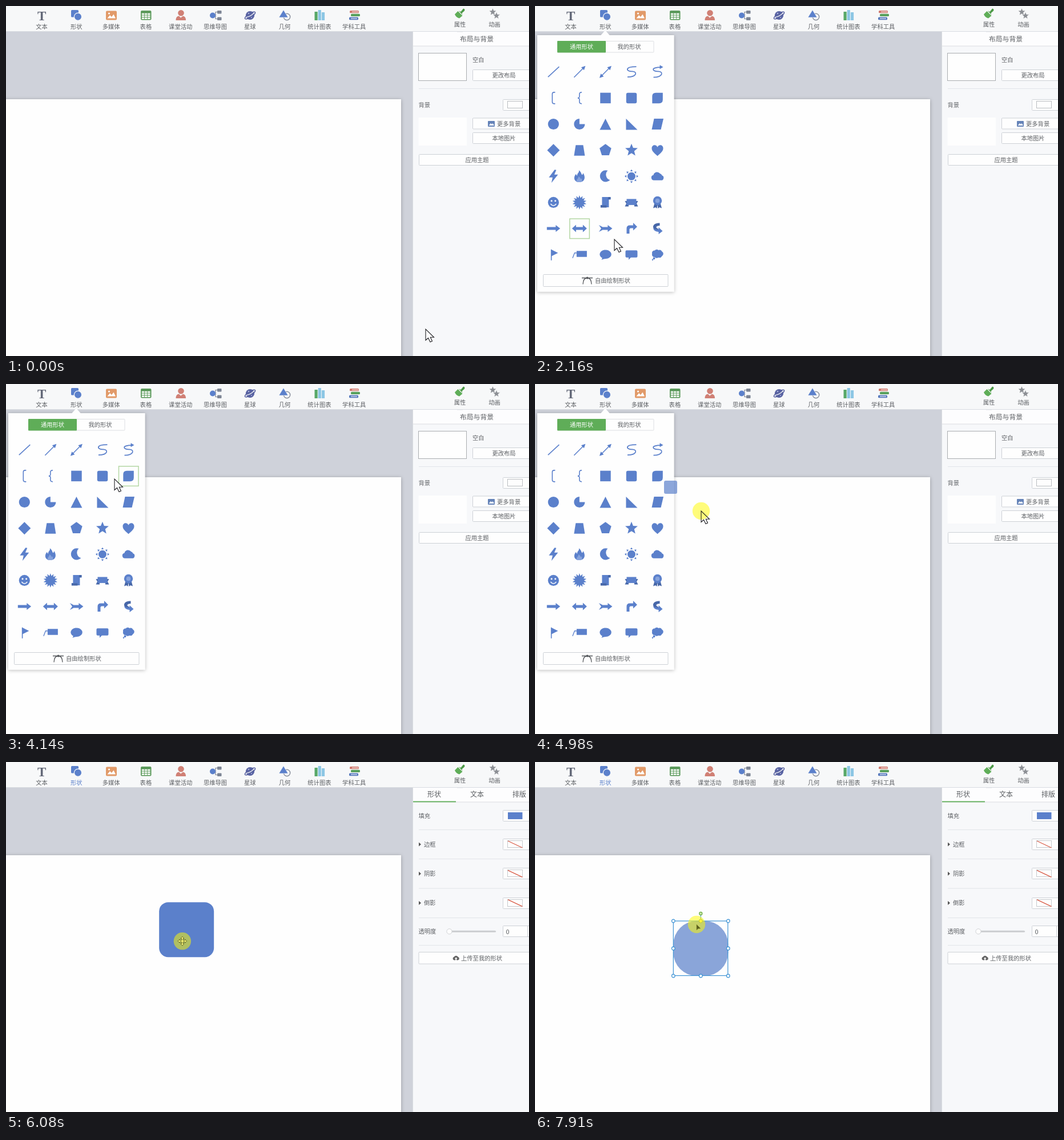
These frames come from a looping animation (916x612 px, 8 s). An HTML page:

```html
<!DOCTYPE html>
<html lang="zh-CN">
<head>
<meta charset="utf-8">
<style>
html, body { margin: 0; width: 100%; height: 100%; overflow: hidden; background: #cfd2da; }
svg { display: block; width: 916px; height: 612px; }
text { font-family: "Noto Sans CJK SC", "Noto Sans CJK", "Noto Sans", sans-serif; }
</style>
</head>
<body>
<svg id="stage" viewBox="0 0 916 612" xmlns="http://www.w3.org/2000/svg"></svg>
<script>
const BLUE = '#5b80cb', DARK = '#4767a8', GREEN = '#5fad58', INK = '#5c5f63', LINE = '#cdd1d6';
const LOOP = 8000;

// ---- markup helpers ----
const text = (x, y, s, o = {}) => {
  const size = o.size || 10.3;
  return `<text x="${x}" y="${y + size * 0.37}" font-size="${size}" fill="${o.fill || INK}"` +
    ` text-anchor="${o.anchor || 'middle'}"${o.id ? ` id="${o.id}"` : ''}>${s}</text>`;
};
const left = (x, y, s, o = {}) => text(x, y, s, { ...o, anchor: 'start' });
const rect = (x, y, w, h, fill, more = '') =>
  `<rect x="${x}" y="${y}" width="${w}" height="${h}" fill="${fill}" ${more}/>`;
const box = (x, y, w, h, stroke = LINE, r = 1) =>
  rect(x + 0.5, y + 0.5, w, h, '#fefefe', `stroke="${stroke}" rx="${r}"`);
const dot = (x, y, r, fill, more = '') => `<circle cx="${x}" cy="${y}" r="${r}" fill="${fill}" ${more}/>`;
const path = (d, fill, more = '') => `<path d="${d}" fill="${fill}" ${more}/>`;
const stroke = (d, color = BLUE, w = 1.6) => path(d, 'none', `stroke="${color}" stroke-width="${w}"`);
const group = (id, body, more = '') => `<g id="${id}" ${more}>${body}</g>`;
const rule = y => rect(723, y, 193, 1, '#e2e5e9');

// regular polygon (inner = outer) or star
function star(n, outer, inner = outer, cx = 0, cy = 0) {
  const m = inner === outer ? n : n * 2, pts = [];
  for (let i = 0; i < m; i++) {
    const a = i / m * 2 * Math.PI - Math.PI / 2, r = i % 2 && m > n ? inner : outer;
    pts.push((cx + r * Math.cos(a)).toFixed(2) + ' ' + (cy + r * Math.sin(a)).toFixed(2));
  }
  return 'M' + pts.join('L') + 'Z';
}

// ---- toolbar ----
function toolbar() {
  const names = ['文本', '形状', '多媒体', '表格', '课堂活动', '思维导图', '星球', '几何', '统计图表', '学科工具'];
  let s = rect(0, 0, 916, 44, '#f7f8f9') + rect(0, 44, 916, 1, '#d9dce1');
  names.forEach((n, i) => s += text(62.5 + i * 60.8, 36, n, { id: 'tool' + i }));
  s += '<text x="62.7" y="24.5" font-size="23" font-weight="700" text-anchor="middle" fill="#626777" style="font-family:\'Liberation Serif\',serif">T</text>';
  s += rect(114, 7, 13, 12.5, BLUE, 'rx="1.5"') + dot(126, 18.8, 6.6, BLUE, 'stroke="#f7f8f9" stroke-width="1.2"');
  s += rect(175, 8.5, 19, 16, '#e19a69', 'rx="2"') + path('M177.5 21.5L182 16l3 3 3.500-4.500 3.500 7Z', '#fff') + dot(180.500, 13, 1.6, '#fff');
  s += rect(236, 8, 18.5, 16.500, '#5c9a5c', 'rx="2"');
  for (let i = 0; i < 9; i++) s += rect(237.800 + i % 3 * 5.200, 12.800 + (i / 3 | 0) * 3.700, 4.300, 2.600, '#fff');
  s += dot(306.500, 12.200, 5.300, '#d08075') + path('M297.500 25Q297.500 17.500 303 17.500L306 20.500 310 17.500Q315 18 315 25Z', '#d08075');
  s += stroke('M362 16.500H367V10.500H371M367 16.500V22.500H371', '#7d8595', 1.2) + dot(362, 16.500, 5, BLUE) +
    rect(370, 8, 7.500, 5.500, '#7d8595', 'rx="1"') + rect(370, 19.500, 7.500, 5.500, '#7d8595', 'rx="1"');
  s += dot(427.500, 16.500, 7.600, '#5963a2') +
    '<ellipse cx="427.500" cy="16.500" rx="10.500" ry="3.400" fill="none" stroke="#5963a2" stroke-width="1.500" transform="rotate(-32 427.500 16.500)"/>' +
    stroke('M421 19.500Q428 18.500 434 12.500', '#f7f8f9', 1.1) + dot(425, 13, 1.3, '#aab2dc') + dot(430, 20, 1, '#aab2dc');
  s += dot(492, 19, 5.700, 'none', 'stroke="#8b919d" stroke-width="1.500"') + path('M486 7L494 20H478Z', BLUE, 'stroke="#f7f8f9" stroke-width=".6"');
  s += rect(540.500, 10, 5.200, 15, '#58a868') + rect(546.700, 7, 5.200, 18, '#8cc6e4') + rect(552.900, 11, 5.200, 14, '#8cc6e4');
  s += rect(602, 8, 16, 4.300, '#d0776c', 'rx="1.500"') + rect(604, 13.800, 16, 4.300, '#58a05c', 'rx="1.500"') +
    rect(601, 19.600, 16, 4.600, '#5578bc', 'rx="1.500"') + rect(606, 9.700, 11, 1, '#fff') + rect(604, 21.400, 11, 1, '#fff');
  s += path('M786 14.500L791.500 9 799.500 17 794 21.500Q788 20 786 14.500Z', GREEN) + path('M793 8.500L796.500 10 801 4.500Q804.500 5 803 8.500L798.500 12.500 799.500 15.500Z', '#4d9a48');
  s += path(star(5, 6.200, 2.700, 852.500, 10.500), '#8d9095') + path(star(5, 7, 3, 859, 17), '#8d9095', 'stroke="#f7f8f9" stroke-width=".8"');
  return s + text(795, 32, '属性') + text(855.500, 32, '动画');
}

// ---- right side ----
const sideBase = () => rect(713, 45, 203, 567, '#f7f8fa') + rect(712, 45, 1, 567, '#d9dce1') +
  rect(713, 45, 203, 25, '#fdfdfe') + rect(713, 69.500, 203, 1, '#dbdee2') +
  path('M790 45L795 41 800 45Z', '#fdfdfe', 'stroke="#d3d6db" stroke-width=".7"');

const pageProps = () => text(824.500, 57.500, '布局与背景', { size: 11.8 }) +
  box(722, 82, 84, 48, '#a9acb0', 0) + left(817, 94, '空白') +
  box(817, 111, 110, 19) + text(872, 121.500, '更改布局') + rule(144) +
  left(722.500, 173, '背景') + box(870, 163, 60, 19) + box(878, 166, 26, 12, '#b9bcc0', 0) +
  rect(722.500, 195, 84.500, 49, '#fefefe') + box(817, 195.500, 110, 19) +
  rect(844, 201, 12, 10, '#6583b8', 'rx="1"') + path('M845.500 209L849 205l2 2 1.500-2 2.500 4Z', '#fff') +
  left(860, 206, '更多背景') + box(817, 221, 110, 19) + text(872, 231, '本地图片') +
  box(723, 259, 204, 19) + text(825, 269.500, '应用主题');

function shapeProps() {
  let s = text(750, 57, '形状', { size: 12 }) + text(825, 57, '文本', { size: 12 }) + text(899, 57, '排版', { size: 12 }) +
    rect(713, 68.500, 75, 1.800, GREEN) + left(722.500, 94, '填充') + box(870, 84, 60, 19) + rect(879, 88, 25.500, 12, BLUE);
  [118, 169, 220.500, 272, 320].forEach(y => s += rule(y));
  ['边框', '阴影', '倒影'].forEach((n, i) => {
    const y = 144 + i * 51.300;
    s += path(`M723 ${y - 3.500}l4 3.500-4 3.500Z`, '#555') + left(732, y, n) + box(870, Math.round(y) - 10, 60, 19) +
      box(878, Math.round(y) - 7, 26, 12, '#c6c9cd', 0) + stroke(`M879 ${y - 6}L904.500 ${y + 6}`, '#d85a45', 1.3);
  });
  return s + left(722.500, 296.500, '透明度') + rect(777, 294.800, 81, 3, '#cbcdd0', 'rx="1.500"') +
    dot(776.500, 296.300, 4.600, '#fefefe', 'stroke="#cfd1d4"') + box(870, 286, 60, 19) + left(875.500, 296.500, '0', { size: 11 }) +
    rect(913, 286, 1, 20, LINE) + box(722.500, 332, 204, 20.500) +
    path('M785 346.500A2.900 2.900 0 0 1 784.800 340.800A3.800 3.800 0 0 1 791.600 340.800A2.900 2.900 0 0 1 791.400 346.500Z', '#666') +
    path('M788.200 341.500l2.400 2.600h-1.500v3.600h-1.800v-3.600h-1.500Z', '#fefefe') + left(797, 343, '上传至我的形状');
}

// ---- shape picker ----
const cellX = c => 32.300 + c * 45.550, cellY = r => 115.200 + r * 45.650;
const row = (r, items) => items.map((m, c) =>
  `<g transform="translate(${cellX(c)} ${cellY(r)})" fill="${BLUE}">${m[0] === '<' ? m : `<path d="${m}"/>`}</g>`).join('');

function picker() {
  const tip = 'M10.500-10.500L8-3 3-8Z', tail = 'M-10.500 10.500L-8 3-3 8Z';
  const cloud = 'M-6 7A4.700 4.700 0 0 1-7-2.300A6.500 6.500 0 0 1 4.500-4.800A5 5 0 0 1 8-1.500A4.400 4.400 0 0 1 6.500 7Z';
  let rays = '';
  for (let i = 0; i < 8; i++) rays += `<path d="M-2.200-8.800L0-12 2.200-8.800Z" transform="rotate(${i * 45})"/>`;
  let puffs = '';
  for (let i = 0; i < 7; i++) puffs += dot(6 * Math.cos(i * 0.9), -1.500 + 3.400 * Math.sin(i * 0.9), 4.200, BLUE);
  return rect(4, 51, 239.500, 448.500, '#fefefe', 'filter="url(#soft)"') + path('M115 51.500L123 42.500 131 51.500Z', '#fefefe') +
    rect(39.500, 61.500, 168.500, 19.500, '#fefefe', 'stroke="#dddfe2" rx="1"') + rect(39, 61, 85, 20.500, GREEN, 'rx="1"') +
    text(81.500, 71.500, '通用形状', { fill: '#fff' }) + text(165, 71.500, '我的形状') +
    row(0, [
      stroke('M-9.500 9L10-9'),
      stroke('M-9.500 9.500L7-7') + path(tip, BLUE),
      stroke('M-7 7L7-7') + path(tip + tail, BLUE),
      stroke('M8.500-9C-13-9-9-.500 1-.800C11-1 10 9-7 9', BLUE, 1.800),
      stroke('M6-8C-13-8-9-.500 1-.800C11-1 10 9-7 9.500', BLUE, 1.800) + path('M10-8.500L4-12V-5Z', BLUE)
    ]) +
    row(1, [
      stroke('M3-10H1Q-2-10-2-7V7Q-2 10 1 10H3'),
      stroke('M4-10Q0-10 0-7V-3Q0 0-3 0Q0 0 0 3V7Q0 10 4 10'),
      rect(-9.200, -9.200, 18.500, 18.500, BLUE),
      rect(-9.200, -9.200, 18.500, 18.500, BLUE, 'rx="3"'),
      'M-3-9.200H9.300V3Q9.300 9.300 3 9.300H-9.200V-3Q-9.200-9.200-3-9.200Z'
    ]) +
    row(2, [
      dot(0, 0, 9.600, BLUE), 'M0 0V-9.600A9.600 9.600 0 1 0 9.600 0Z', 'M0-9.500L10 10H-10Z',
      'M-9.500-9.500V10H10.500Z', 'M-6-9.500H10.500L6 9.500H-10Z'
    ]) +
    row(3, [
      star(4, 11), 'M-6.500-9H6.500L9.500 9.500H-9.500Z', star(5, 10.800), star(5, 11.500, 5),
      'M0 10C-7 4-10 1-10-3.500C-10-9.500-2.500-11 0-5.500C2.500-11 10-9.500 10-3.500C10 1 7 4 0 10Z'
    ]) +
    row(4, [
      'M2-11.500L-8 2H-1.500L-3.500 11.500 8-3H1.500L5-11Z',
      path('M-1-10.500C4-7 3-3 5-2.500Q6.500-4 6-6C11 0 10 9 2 10H-3C-11 8-10 0-6-4Q-5-1-4-1C-4-6 0-6-1-10.500Z', BLUE) +
        path('M-5 10C-6 5-2 5-1.500 0Q2 3 2 5 3 4 3.500 3.500Q6 8 3 10Z', '#86a3dd'),
      'M4-10A10.200 10.200 0 1 0 8 6.500A9.800 9.800 0 0 1 4-10Z',
      dot(0, 0, 7, BLUE) + rays, cloud
    ]) +
    row(5, [
      dot(0, 0, 9.600, BLUE) + dot(-3.300, -2.800, 1.500, '#fff') + dot(3.300, -2.800, 1.500, '#fff') + stroke('M-5 2.500Q0 8.500 5 2.500', '#fff', 1.4),
      star(14, 12.500, 8),
      path('M-6-9.500H9V-5H6V8.500H-8.500V4.500H-6Z', BLUE) + path('M5-9.500H9V-5.500H4ZM-8.500 5H2V9H-8.500Z', DARK),
      path('M-11.500-2.500H-5V7H-11.500L-9 2ZM11.500-2.500H5V7H11.500L9 2Z', DARK) + rect(-8.500, -6, 17, 10.500, BLUE),
      path('M-5 1L-7.500 10-3.500 8.500-1 10.500 0 4 1 10.500 3.500 8.500 7.500 10 5 1Z', DARK) + dot(0, -3, 7.700, BLUE) + dot(0, -3, 3.800, '#86a3dd')
    ]) +
    row(6, [
      'M-11.500-2.500H4V-6L11.800 0 4 6V2.500H-11.500Z',
      'M-13 0L-6-6.500V-2.500H6V-6.500L13 0 6 6.500V2.500H-6V6.500Z',
      'M-11.500-6L-5-2.500H4V-6L12 0 4 6V2.500H-5L-11.500 6-7.500 0Z',
      'M-8.500 9V0Q-8.500-5.500-3-5.500H3V-10L10-3 3 3.500V-.500H-1Q-3.500-.500-3.500 2V9Z',
      path('M4-9.500C-6-10-10-4-6 1Q-4 4 2 4.500V1Q-3-1-2-3 0-5 4-5Z', DARK) + path('M-7.500-1Q-5 2 2 2V-2L9 4.500 2 10V6Q-7 5-7.500-1Z', BLUE)
    ]) +
    row(7, [
      path('M-4-9L8-3-4 3Z', BLUE) + rect(-4.500, -9, 1.600, 19, BLUE),
      rect(-5, -6.500, 18, 10.500, BLUE) + stroke('M-5-3H-8.500L-12 6', BLUE, 1.300),
      'M-7 9L-5.500 6A10.200 7.800 0 1 1 0 7.300Q-3 7.300-7 9Z',
      'M-8.500-7.500H8.500Q10.500-7.500 10.500-5.500V3Q10.500 5 8.500 5H-1L-5 9V5H-8.500Q-10.500 5-10.500 3V-5.500Q-10.500-7.500-8.500-7.500Z',
      puffs + dot(0, -1.500, 5, BLUE) + dot(-6, 6.500, 1.900, BLUE) + dot(-8.500, 9, 1.200, BLUE)
    ]) +
    box(14, 469, 218.500, 21) + stroke('M82 475.500H101M84 486.500Q84.500 475.500 91.500 475.500T99 486.500', '#55585c', 1.3) +
    dot(91.500, 475.500, 1.900, '#55585c') + left(105, 480.500, '自由绘制形状');
}

// ---- selected shape ----
const SIZE = 96, ring = 'stroke="#3c92d4" stroke-width="1.200"';
function handles() {
  const h = SIZE / 2;
  let s = rect(0, 0, SIZE - 0.500, SIZE - 0.500, 'none', ring) + stroke(`M${h} -11V0`, '#3c92d4', 1.1) +
    dot(h, -13, 2.600, '#c9e8a5', 'stroke="#66a83f" stroke-width="1.100"');
  for (let i = 0; i < 9; i++) if (i !== 4) s += dot(i % 3 * h, (i / 3 | 0) * h, 2.800, '#fff', ring);
  return s + path('M0-3.500L3.500 0 0 3.500-3.500 0Z', '#fff27a', 'id="knob" stroke="#b9a92c" stroke-width=".8"');
}

const ARROW = 'M0 0V19.500L4.500 15.500 8 22.500 11.500 21 8.300 14.300H14.500Z';
const MOVE = 'M0-8L3-4.500H1.200V-1.200H4.500V-3L8 0 4.500 3V1.200H1.200V4.500H3L0 8-3 4.500H-1.200V1.200H-4.500V3L-8 0-4.500-3V-1.200H-1.200V-4.500H-3Z';
const SMALL = 'M0 0V10L2.600 7.600 7 7Z';

stage.innerHTML =
  '<defs><filter id="soft" x="-10%" y="-10%" width="120%" height="120%"><feDropShadow dx="0" dy="1" stdDeviation="3" flood-color="#000" flood-opacity=".28"/></filter></defs>' +
  rect(0, 0, 916, 612, '#cfd2da') + rect(-10, 163, 702, 470, '#fefefe', 'filter="url(#soft)"') +
  sideBase() + group('pageProps', pageProps()) + group('shapeProps', shapeProps()) + toolbar() +
  group('shape', rect(0, 0, SIZE, SIZE, BLUE, 'id="body"') + group('grips', handles())) +
  group('picker', picker()) + rect(0, 0, 34.500, 34.500, 'none', 'id="hover" stroke="#b4d7a4" stroke-width="1.500"') +
  rect(-11.500, -11.500, 23, 23, BLUE, 'id="ghost" rx="3" opacity=".7"') +
  group('tooltip', rect(133.500, 48.500, 244, 45, '#eeeeee', 'rx="2" filter="url(#soft)"') +
    left(143.500, 62, '形状', { fill: '#8a8a8a' }) + left(143.500, 80.500, '选取要绘制的形状，例如：线条、矩形、三角形等', { fill: '#a2a2a2', size: 10.15 })) +
  group('mouse', path('', '#fff', 'id="fill"') + dot(0, 0, 15.200, '#fffa00', 'id="halo" fill-opacity=".52"') +
    path('', 'none', 'id="edge" stroke="#1e1e22" stroke-width="1.100"'));

// ---- motion ----
const $ = id => document.getElementById(id);
const set = (id, k, v) => $(id).setAttribute(k, v);
const show = (id, on) => set(id, 'display', on ? 'inline' : 'none');
const place = (id, x, y) => set(id, 'transform', `translate(${x} ${y})`);
const within = (t, a, b) => t >= a && t < b;
const ramp = (t, a, b) => Math.max(0, Math.min(1, (t - a) / (b - a)));

// keys are [time, x, y, eased]
function along(keys, t) {
  const i = keys.findIndex(k => k[0] > t);
  if (i === 0) return keys[0].slice(1, 3);
  if (i < 0) return keys[keys.length - 1].slice(1, 3);
  const [t0, x0, y0] = keys[i - 1], [t1, x1, y1, eased] = keys[i];
  let u = (t - t0) / (t1 - t0);
  if (eased) u = u * u * (3 - 2 * u);
  return [x0 + (x1 - x0) * u, y0 + (y1 - y0) * u];
}

const approach = [[70, 735, 565], [790, 129, 23, 1], [960, 129, 23], [1270, 145, 62], [1720, 150, 132],
  [1770, 150, 132], [1850, 196, 165], [1930, 212, 235], [2010, 180, 330], [2080, 84, 385], [2160, 139, 408]];
const choose = [[3410, 139, 408], [3620, 220, 330], [3810, 298, 225], [3960, 275, 172], [4070, 214, 158], [4140, 190, 166],
  [4230, 190, 166], [4380, 172, 163], [4560, 172, 163], [4980, 291, 222, 1], [5110, 291, 222], [5400, 352, 263, 1]];
const adjust = [[5460, 352, 263], [5680, 345, 283], [5840, 345, 283], [6080, 309, 313], [6280, 283, 346], [6360, 283, 346],
  [6640, 248, 275, 1], [6710, 248, 275], [6940, 251, 275], [7090, 257, 281], [7350, 241, 279], [7520, 241, 284], [7910, 283, 284, 1]];
const pointer = [...approach, ...choose, ...adjust];
const ghostPath = [[4600, 169, 161], [4980, 237.500, 180.500], [5110, 237.500, 180.500], [5400, 352, 263, 1]];
const radius = [[7090, 16, 0], [7350, 0, 0], [7520, 0, 0], [7910, 41, 0, 1]];

// [time, column, row] of the highlighted cell; column -1 is none
const hovers = [[0, -1, 0], [1850, 3, 1], [1920, 4, 2], [1990, 4, 4], [2060, 3, 5], [2110, 1, 6],
  [3480, 3, 6], [3560, 4, 5], [3660, -1, 0], [4060, 4, 1], [4230, 3, 1], [4620, -1, 0]];

function draw(t) {
  const [x, y] = along(pointer, t), dropped = t >= 5400, dragging = within(t, 5840, 6290), rounding = t >= 7090;

  show('picker', within(t, 1370, 5400));
  set('picker', 'opacity', ramp(t, 1340, 1450));
  show('tooltip', within(t, 1190, 1400));
  set('tooltip', 'opacity', 0.85 * ramp(t, 1170, 1260));
  set('tool1', 'fill', dropped ? BLUE : INK);
  show('pageProps', !dropped);
  show('shapeProps', dropped);

  const [, col, line] = hovers.filter(h => h[0] <= t).pop();
  show('hover', col >= 0);
  place('hover', cellX(col) - 17, cellY(line) - 17);

  show('ghost', within(t, 4600, 5400));
  place('ghost', ...along(ghostPath, t));

  const [sx, sy] = dragging ? [x - 41, y - 68] : t < 5840 ? [304, 215] : [242, 278];
  const r = along(radius, t)[0];
  show('shape', dropped);
  place('shape', sx + 0.300, sy);
  set('body', 'rx', r);
  set('body', 'opacity', rounding ? 0.7 : 1);
  show('grips', !dragging);
  place('knob', Math.min(SIZE / 2, r * 1.17), 0);

  const d = rounding ? SMALL : within(t, 5640, 6400) ? MOVE : ARROW;
  place('mouse', x, y);
  set('fill', 'd', d);
  set('edge', 'd', d);
  set('edge', 'fill', rounding ? '#5a5f1c' : 'none');
  set('edge', 'stroke', rounding ? '#8b8f30' : d === MOVE ? '#55591c' : '#1e1e22');
  set('edge', 'stroke-width', rounding ? 0.5 : d === MOVE ? 0.9 : 1.1);
  show('halo', within(t, 820, 1010) || within(t, 4450, 5400) || dragging || rounding);
}

const start = performance.now();
function tick() {
  draw((performance.now() - start) % LOOP);
  requestAnimationFrame(tick);
}
tick();
</script>
</body>
</html>
```
